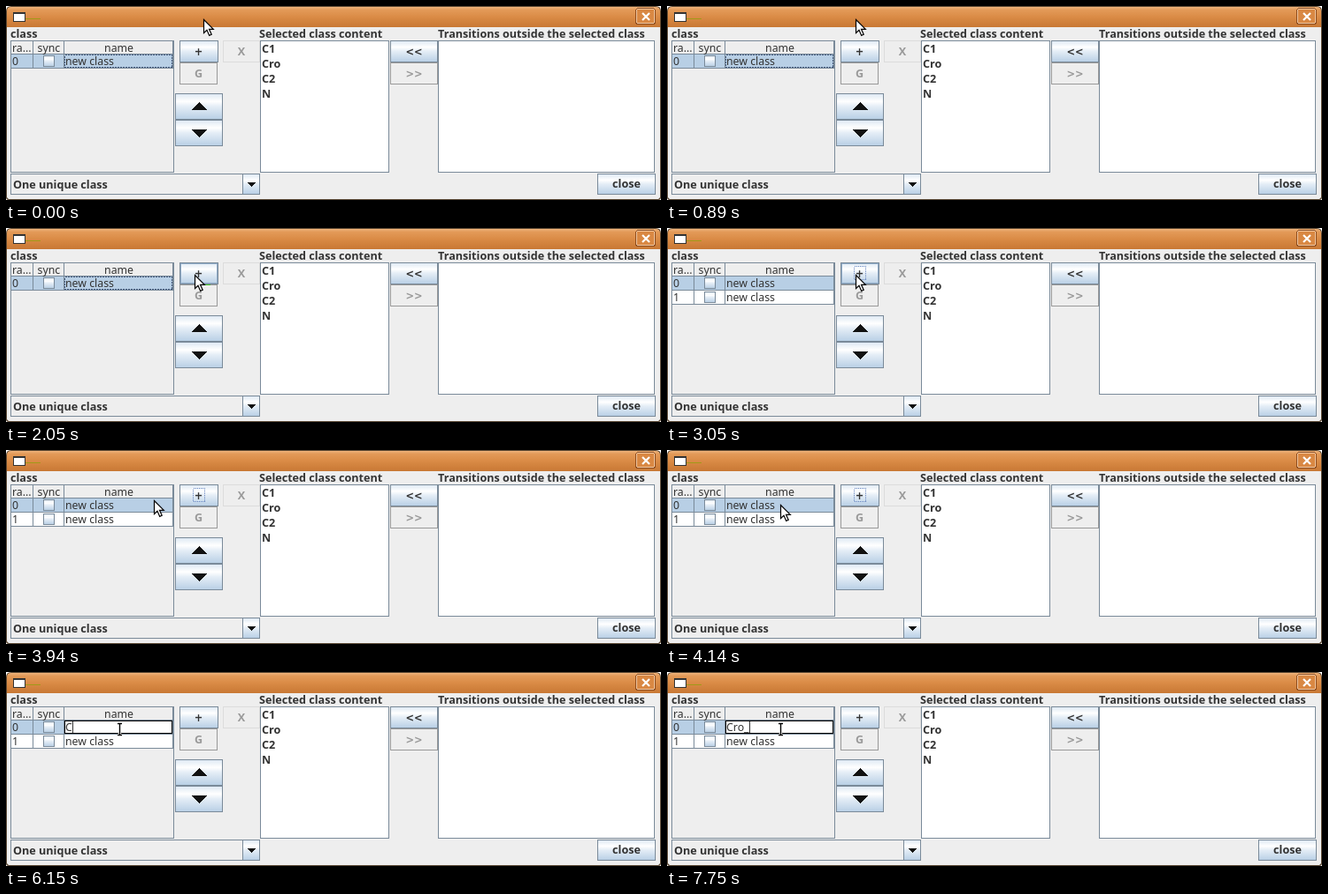
An HTML page for the animation above (8 s loop, 740 by 220 pixels).

```html
<!DOCTYPE html>
<html lang="en">
<head>
<meta charset="utf-8">
<title>Class editor</title>
<style>
html, body { margin: 0; width: 100%; height: 100%; overflow: hidden; background: #fff; }
svg { display: block; width: 740px; height: 220px; }
text { font: 12.3px "Noto Sans", sans-serif; fill: #333; white-space: pre; }
.bold text { font-weight: bold; font-size: 12.6px; }
.bold .sign { font: bold 11.4px "DejaVu Sans", sans-serif; }
.mid { text-anchor: middle; }
text.off { fill: #999; }
rect, .grid, .crisp { shape-rendering: crispEdges; }
.box rect { stroke: #7a8a99; fill: url(#metal); }
.box .off { stroke: #999; fill: #eee; }
.box .faint { stroke: #dcdcdc; fill: #eee; }
.box .white { fill: #fff; }
.box .plain { fill: #eee; }
.grid { stroke: #7a8a99; fill: none; }

/* One 8 s loop; every change is a hard step. */
.anim { animation: 8s step-end infinite; }
.flash { visibility: hidden; }
.hover { animation-name: hover; }
.pressed { animation-name: pressed; }
.buttonFocus { animation-name: buttonFocus; }
.cellFocus { animation-name: cellFocus; }
.secondRow { animation-name: secondRow; }
.clickMark { animation-name: clickMark; }
.cellMark { animation-name: cellMark; }
.editing { animation-name: editing; }
.key1 { animation-name: key1; }
.key2 { animation-name: key2; }
.key3 { animation-name: key3; }
.caret { animation-name: caret; }
.arrow { animation-name: arrow; }

@keyframes hover {
  19.625%, 38.125% { visibility: visible; }
  33.625%, 48.75% { visibility: hidden; }
}
@keyframes pressed { 33.625% { visibility: visible; } 38.125% { visibility: hidden; } }
@keyframes buttonFocus { 33.625% { visibility: visible; } 60.375% { visibility: hidden; } }
@keyframes cellFocus {
  0%, 60.375% { visibility: visible; }
  33.625%, 76.875% { visibility: hidden; }
}
@keyframes secondRow { 38.125%, 100% { visibility: visible; } }
@keyframes clickMark { 25.625% { visibility: visible; } 33.625% { visibility: hidden; } }
@keyframes cellMark { 65.375% { visibility: visible; } 76.875% { visibility: hidden; } }
@keyframes editing { 76.875%, 100% { visibility: visible; } }
@keyframes key1 { 89.875%, 100% { visibility: visible; } }
@keyframes key2 { 91.375%, 100% { visibility: visible; } }
@keyframes key3 { 96.875%, 100% { visibility: visible; } }
@keyframes caret {
  0%, 82.375% { visibility: hidden; transform: translateX(75px); }
  76.875%, 88.375% { visibility: visible; transform: translateX(75px); }
  89.875% { visibility: visible; transform: translateX(80px); }
  91.375% { visibility: visible; transform: translateX(87px); }
  96.875%, 100% { visibility: visible; transform: translateX(93px); }
}
@keyframes arrow {
  0% { transform: translate(223px, 15px); }
  10.125% { transform: translate(220px, 15px); }
  10.625% { transform: translate(216px, 15px); }
  11.125% { transform: translate(213px, 15px); }
  17.625% { transform: translate(213px, 18px); }
  18.125% { transform: translate(213px, 24px); }
  18.625% { transform: translate(214px, 30px); }
  19.125% { transform: translate(214px, 37px); }
  19.625% { transform: translate(213px, 43px); }
  20.125% { transform: translate(212px, 48px); }
  20.625% { transform: translate(211px, 51px); }
  21.125% { transform: translate(211px, 52px); }
  25.125% { transform: translate(212px, 52px); }
  25.625% { transform: translate(213px, 53px); }
  48.25% { transform: translate(196px, 55px); }
  48.75% { transform: translate(180px, 56px); }
  49.25% { transform: translate(167px, 57px); }
  49.75% { transform: translate(153px, 59px); }
  50.25% { transform: translate(142px, 60px); }
  50.75% { transform: translate(134px, 61px); }
  51.25% { transform: translate(130px, 62px); }
  51.75% { transform: translate(128px, 62px); visibility: visible; }
  76.875%, 100% { transform: translate(128px, 62px); visibility: hidden; }
}
</style>
</head>
<body>
<svg viewBox="0 0 740 220">
  <defs>
    <linearGradient id="metal" x2="0" y2="1">
      <stop offset="0" stop-color="#dde8f3"/>
      <stop offset=".3" stop-color="#fff"/>
      <stop offset=".5" stop-color="#e4edf6"/>
      <stop offset="1" stop-color="#b8cfe5"/>
    </linearGradient>
    <linearGradient id="bar" x2="0" y2="1">
      <stop offset="0" stop-color="#efb47c"/>
      <stop offset=".15" stop-color="#e39a58"/>
      <stop offset=".5" stop-color="#da8b46"/>
      <stop offset="1" stop-color="#c87834"/>
    </linearGradient>
    <g id="check">
      <rect x=".5" y=".5" width="12" height="12" fill="url(#metal)" stroke="#7a8a99"/>
    </g>
    <path id="beam" d="M126 58.5H128L128.5 59.5L129 58.5H131M128.5 59V71M126 71.5H128L128.5 70.5L129 71.5H131" fill="none"/>
  </defs>

  <!-- window -->
  <path d="M0 217V6Q0 0 6 0H734Q740 0 740 6V217Q740 220 737 220H3Q0 220 0 217Z" fill="#55432f"/>
  <path d="M1 24V6Q1 1 6 1H734Q739 1 739 6V24Z" fill="url(#bar)"/>
  <path d="M1 24H739V217L737 219H3L1 217Z" fill="#eee"/>
  <rect x="8.5" y="7.5" width="13" height="10" fill="#fff" stroke="#333"/>
  <rect x="8" y="7" width="14" height="2" fill="#333"/>
  <rect x="22" y="14" width="17" height="1" fill="#a09a18"/>
  <rect x="711.5" y="2.5" width="22" height="18" rx="3" fill="#d98843" stroke="#8f4e20"/>
  <rect x="712.5" y="3.5" width="20" height="16" rx="2" fill="none" stroke="#f3c8a0"/>
  <path d="M719 8L727 16M727 8L719 16" stroke="#fff" stroke-width="2.2"/>

  <!-- panes and buttons -->
  <g class="box" transform="translate(.5 .5)">
    <rect class="plain" x="5" y="39" width="184" height="149"/>
    <rect class="white" x="287" y="39" width="145" height="149"/>
    <rect class="white" x="488" y="39" width="244" height="149"/>
    <rect class="faint" x="245" y="39" width="41" height="24"/>
    <rect class="off" x="196" y="64" width="42" height="24"/>
    <rect x="196" y="39" width="43" height="24"/>
    <rect x="191" y="99" width="53" height="29"/>
    <rect x="191" y="129" width="53" height="29"/>
    <rect x="434" y="39" width="53" height="24"/>
    <rect class="off" x="434" y="64" width="53" height="24"/>
    <rect class="plain" x="5" y="190" width="281" height="23"/>
    <rect x="267" y="190" width="19" height="23"/>
    <rect x="668" y="190" width="65" height="23"/>
  </g>
  <rect class="anim flash hover" x="197.5" y="40.5" width="41" height="22" fill="none" stroke="#8fabc8"/>
  <rect class="anim flash pressed" x="197" y="40" width="42" height="23" fill="#b8cfe5"/>
  <rect class="anim flash buttonFocus" x="211.5" y="43.5" width="13" height="15" fill="none" stroke="#6382bf" stroke-dasharray="1"/>
  <path class="crisp" d="M218 109L227 118H209ZM218 149L227 140H209ZM272 200H282L277 205Z" fill="#111"/>

  <g class="bold">
    <text x="5" y="36">class</text>
    <text x="286" y="36">Selected class content</text>
    <text x="488" y="36">Transitions outside the selected class</text>
    <text x="289" y="53">C1</text>
    <text x="289" y="70">Cro</text>
    <text x="289" y="87">C2</text>
    <text x="289" y="104">N</text>
    <text x="8" y="207">One unique class</text>
    <g class="mid">
      <text class="sign" x="217.5" y="56">+</text>
      <text class="off" x="217.5" y="81">G</text>
      <text class="off" x="266" y="56">X</text>
      <text class="sign" x="461" y="56">&lt;&lt;</text>
      <text class="sign off" x="461" y="81">&gt;&gt;</text>
      <text x="701" y="206">close</text>
    </g>
  </g>

  <!-- table -->
  <path class="grid" d="M6 54.5H189M30.5 40V54M65.5 40V54M188.5 40V54"/>
  <text x="7" y="52">ra...</text>
  <text x="35.5" y="52">sync</text>
  <text class="mid" x="127.5" y="52">name</text>

  <rect x="6" y="55" width="183" height="15" fill="#b8cfe5"/>
  <path class="grid" d="M6 70.5H189M30.5 55V70M65.5 55V70M188.5 55V70"/>
  <text x="7" y="67">0</text>
  <use href="#check" x="42" y="56"/>
  <text x="67" y="67">new class</text>
  <rect class="anim flash cellFocus" x="66.5" y="55.5" width="121" height="14" fill="none" stroke="#3f5578" stroke-dasharray="2 1"/>

  <g class="anim flash secondRow">
    <rect x="6" y="71" width="183" height="15" fill="#fff"/>
    <path class="grid" d="M6 86.5H189M30.5 71V86M65.5 71V86M188.5 71V86"/>
    <text x="7" y="83">1</text>
    <use href="#check" x="42" y="72"/>
    <text x="67" y="83">new class</text>
  </g>

  <!-- cell editor -->
  <g class="anim flash editing">
    <rect x="66.5" y="55.5" width="121" height="14" fill="#fff" stroke="#000"/>
    <text x="67" y="67">C<tspan class="anim flash key1">r</tspan><tspan class="anim flash key2">o</tspan><tspan class="anim flash key3">_</tspan></text>
    <use href="#beam" stroke="#fff" stroke-width="3"/>
    <use href="#beam" stroke="#000" stroke-width="1.4"/>
  </g>
  <rect class="anim flash caret" y="56" width="1" height="13" fill="#333"/>

  <!-- pointer -->
  <rect class="anim flash clickMark" x="221" y="64" width="10" height="1" fill="#3fc423"/>
  <rect class="anim flash cellMark" x="134" y="71" width="9" height="1" fill="#a3b53c"/>
  <g class="anim arrow">
    <path d="M.5 .5V15.5L4 12.2L6.7 18.4L9.2 17.3L6.5 11.3H11.3Z" fill="#fff" stroke="#000" stroke-width="1.2"/>
  </g>
</svg>
</body>
</html>
```
